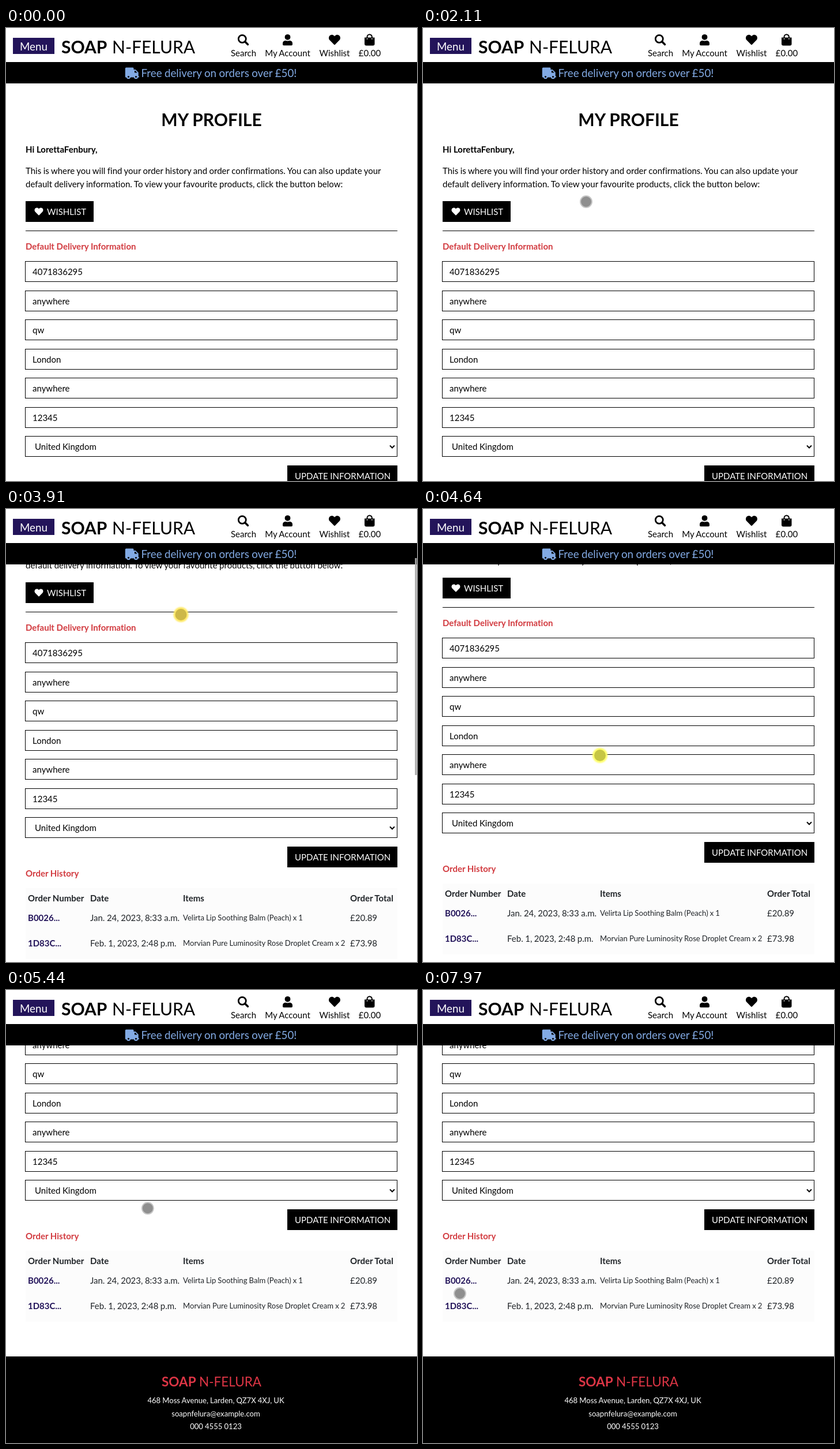
These frames come from a looping animation (713 by 785 pixels, 8000 ms). An HTML page:

```html
<!DOCTYPE html>
<html lang="en">
<head>
<meta charset="utf-8">
<title>My profile</title>
<style>
  html, body { margin: 0; width: 100%; height: 100%; overflow: hidden; background: #fff; }
  svg { display: block; width: 100vw; height: 100vh; font: 15px Lato, sans-serif; }
  text { word-spacing: -.023em; font-variant-ligatures: none; }
  .b { font-weight: 700; word-spacing: 0; }
  .mid { text-anchor: middle; }
  .white { fill: #fff; }
  .red { fill: #d23b40; }
  .small { font-size: 13.125px; }
  .large { font-size: 18.75px; }
  .title { font-size: 30px; }
  .ink { fill: #212529; }
  .navy { fill: #23145a; }
  .field { fill: #fff; stroke: #000; }
  .line { fill: none; stroke: #000; stroke-width: 2; }
</style>
</head>
<body>
<svg viewBox="0 0 713 785">
  <defs>
    <path id="heart" d="M462 62C407 16 326 24 276 76l-20 20-20-20C186 24 105 16 50 62c-63 54-66 150-10 208l193 200c13 13 33 13 46 0l193-200c56-58 53-154-10-208z"/>
    <filter id="soft" x="-50%" y="-50%" width="200%" height="200%"><feGaussianBlur stdDeviation=".8"/></filter>
  </defs>

  <g id="page">
    <text class="title b mid" x="356.5" y="170">MY PROFILE</text>
    <text class="b" x="34" y="216">Hi LorettaFenbury,</text>
    <text x="34" y="253">This is where you will find your order history and order confirmations. You can also update your</text>
    <text x="34" y="276">default delivery information. To view your favourite products, click the button below:</text>
    <rect x="34" y="300" width="118" height="36"/>
    <use href="#heart" class="white" transform="translate(49.5 310.5) scale(.0293)"/>
    <text class="white" x="71" y="324">WISHLIST</text>
    <rect x="34" y="351" width="645" height="1"/>
    <text class="b red" x="34" y="384">Default Delivery Information</text>
    <g id="fields"></g>
    <path class="line" d="M666 723.5l4 4 4-4"/>
    <rect x="488" y="758" width="191" height="36"/>
    <text class="white" x="501" y="781.5">UPDATE INFORMATION</text>
    <text class="b red" x="34" y="810">Order History</text>
    <rect x="34" y="830" width="645" height="123" fill="#fcfcfc"/>
    <g id="orders"></g>
    <rect y="1013" width="713" height="700"/>
    <g fill="#dc3545" font-size="22.5">
      <text class="b" x="270" y="1064.5">SOAP</text>
      <text x="335" y="1064.5">N-FELURA</text>
    </g>
    <g class="small white mid">
      <text x="364" y="1094">468 Moss Avenue, Larden, QZ7X 4XJ, UK</text>
      <text x="364" y="1116.5">soapnfelura@example.com</text>
      <text x="364" y="1139">000 4555 0123</text>
    </g>
  </g>

  <g id="header">
    <rect class="white" width="713" height="59"/>
    <rect class="navy" x="12" y="17" width="72" height="28"/>
    <text class="large white" x="24" y="38.5">Menu</text>
    <text class="title b" x="96" y="43.5">SOAP</text>
    <text class="title" x="184" y="43.5">N-FELURA</text>
    <circle cx="409.8" cy="18.8" r="6.5" fill="none" stroke="#000" stroke-width="2.8"/>
    <path d="M414.5 23.5l5 5" stroke="#000" stroke-width="3.4" stroke-linecap="round"/>
    <circle cx="488.5" cy="15.8" r="4.9"/>
    <path d="M480 28.5v-1.5q0-5 5-5.2 3.5 1.5 7 0 5 .2 5 5.2v1.5q0 1.8-1.8 1.8h-13.4q-1.8 0-1.8-1.8z"/>
    <use href="#heart" transform="translate(560 10.5) scale(.039)"/>
    <path d="M622 16.5h17.5v11q0 3-3 3h-11.5q-3 0-3-3z"/>
    <path class="line" d="M626.5 19v-3.5a4.2 4.2 0 0 1 8.4 0v3.5"/>
    <path d="M625.8 18.8h1.6m6.6 0h1.6" stroke="#fff" stroke-width="1.4"/>
    <g class="mid">
      <text x="412" y="49">Search</text>
      <text x="488.5" y="49">My Account</text>
      <text x="570" y="49">Wishlist</text>
      <text x="631" y="49">£0.00</text>
    </g>
    <rect y="59" width="713" height="37"/>
    <g fill="#82aae4">
      <path d="M208.5 68.5h11.5q1.5 0 1.5 1.5v2h3.2l5 5v6.5h1.3v2h-23.500q-.7 0-.7-1.500v-14q0-1.500 1.700-1.500z"/>
      <circle cx="212.5" cy="84.5" r="3.7"/>
      <circle cx="225.5" cy="84.5" r="3.7"/>
      <text class="large" x="234.5" y="85">Free delivery on orders over £50!</text>
    </g>
    <path d="M223 74h1.3l3.5 3.5h-4.8z"/>
    <circle cx="212.5" cy="84.5" r="1.6"/>
    <circle cx="225.5" cy="84.5" r="1.6"/>
  </g>

  <rect id="bar" x="709.5" width="3" height="376" fill="#a9a9a9"/>
  <g id="cursor">
    <circle id="glow" r="13" filter="url(#soft)"/>
    <circle id="dot" r="10" stroke-width="2"/>
  </g>
</svg>

<script>
const $ = id => document.getElementById(id);

function set(el, attrs) {
  for (const key in attrs) el.setAttribute(key, attrs[key]);
}

function add(parent, tag, attrs, text = '') {
  const el = document.createElementNS('http://www.w3.org/2000/svg', tag);
  set(el, attrs);
  el.textContent = text;
  parent.append(el);
}

['4071836295', 'anywhere', 'qw', 'London', 'anywhere', '12345', 'United Kingdom'].forEach((value, i) => {
  const y = Math.round(404.4 + 50.5 * i);
  add($('fields'), 'rect', { class: 'field', x: 33.5, y: y + .5, width: 645, height: 35 });
  add($('fields'), 'text', { x: value === 'United Kingdom' ? 50 : 46, y: y + 24 }, value);
});

const columns = [38, 146, 307, 597];
[
  ['Order Number', 'Date', 'Items', 'Order Total'],
  ['B0026...', 'Jan. 24, 2023, 8:33 a.m.', 'Velirta Lip Soothing Balm (Peach) x 1', '£20.89'],
  ['1D83C...', 'Feb. 1, 2023, 2:48 p.m.', 'Morvian Pure Luminosity Rose Droplet Cream x 2', '£73.98']
].forEach((cells, row) => cells.forEach((cell, col) => {
  const style = !row ? 'ink b' : ['navy b', 'ink', 'ink small', 'ink'][col];
  const y = row ? 843 + 44 * row : 853;
  add($('orders'), 'text', { class: style, x: columns[col], y: style === 'ink small' ? y - 1.5 : y }, cell);
}));

const LOOP = 8000, TICK = 200 / 3, FIRST = 358;

const drags = [
  { from: 43.95, to: 55, by: 181 },
  { from: 64, to: 70.4, by: 197 }
];

// Pointer moves: start, end, x, y. It rests in between.
const origin = [831, 1013];
const moves = [
  [-8, 12, 302, 243], [12, 15, 197, 247], [15, 18, 246, 256], [19, 26, 283, 301],
  [36, 41, 283, 322], [42, 43, 293, 355], [43.95, 55, 304, 175], [57, 62, 307, 427],
  [64, 70.4, 325, 220], [73, 80, 110, 650], [80, 85, 14, 514], [86, 91, 125, 488],
  [91, 98, 48, 444], [99, 101, 122, 450], [104, 109, 11, 495], [109, 114, 64, 526]
];

function ease(from, to, t) {
  const k = Math.min(1, Math.max(0, (t - from) / (to - from)));
  return k * k * k * (10 - 15 * k + 6 * k * k);
}

function pointerAt(t) {
  return moves.reduce(([px, py], [from, to, x, y]) => {
    const k = ease(from, to, t);
    return [px + (x - px) * k, py + (y - py) * k];
  }, origin);
}

function draw(time) {
  const t = Math.floor((time - FIRST) / TICK);
  const [x, y] = pointerAt(t);
  const offset = drags.reduce((sum, d) => sum + d.by * ease(d.from, d.to, t), 0);
  const scrolling = drags.some(d => t > d.from && t < d.to);
  const pressed = drags.some(d => t >= d.from - 3 && t < d.to);

  set($('page'), { transform: `translate(0 ${-Math.round(offset)})` });
  set($('bar'), { y: 2.6 + offset * .4765, opacity: scrolling ? 1 : 0 });
  set($('cursor'), { transform: `translate(${x} ${y})`, opacity: t < 0 ? 0 : 1 });
  set($('glow'), { fill: scrolling ? '#ffe966' : '#ffff6a', opacity: pressed ? 1 : 0 });
  set($('dot'), {
    fill: scrolling ? '#cdb848' : pressed ? '#c6c644' : '#8f8f8f',
    stroke: pressed ? 'none' : '#c6c6c6'
  });
}

const start = performance.now();
function tick() {
  draw((performance.now() - start) % LOOP);
  requestAnimationFrame(tick);
}
tick();
</script>
</body>
</html>
```
